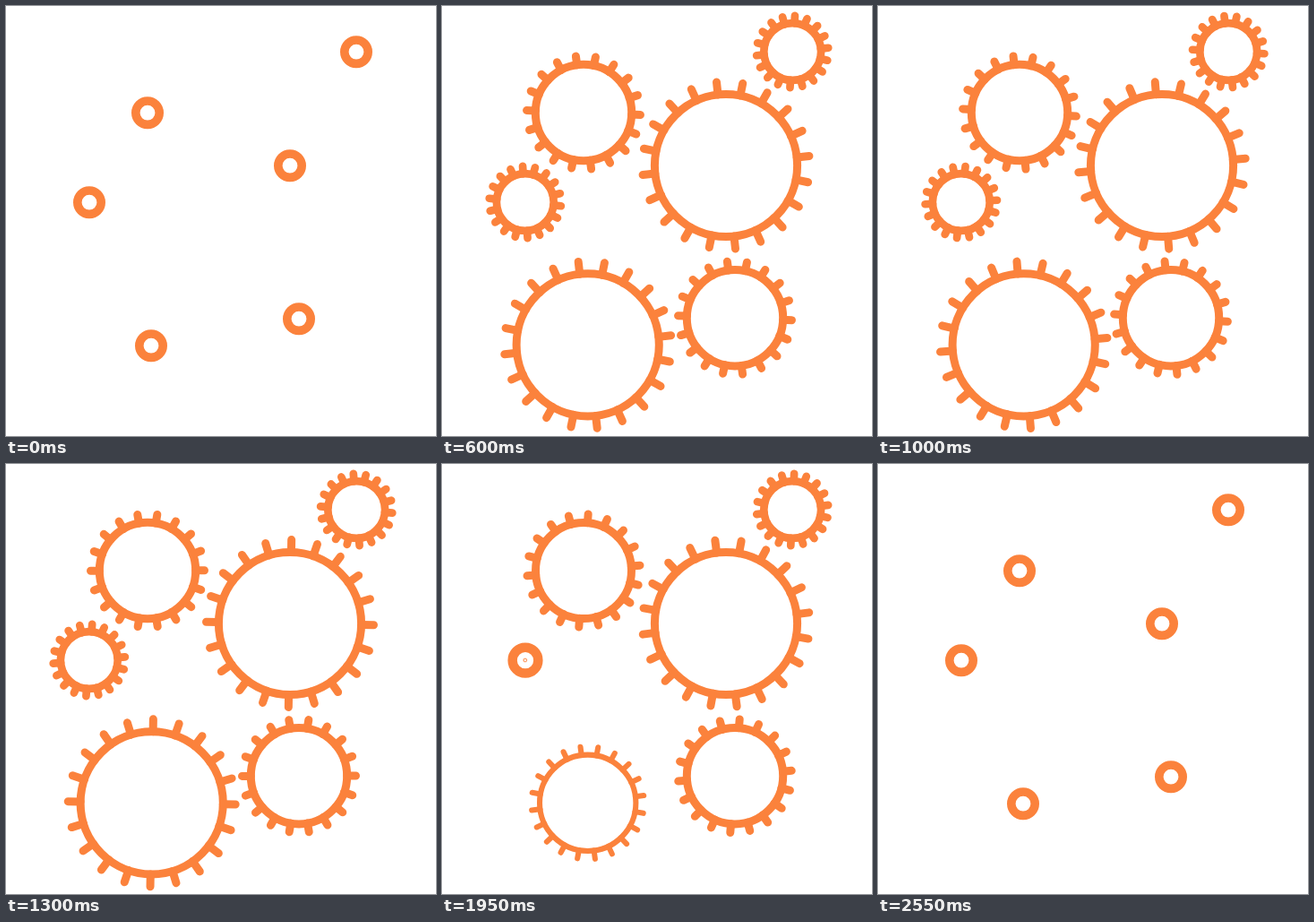
An HTML page with a canvas for the animation above (2750 ms loop, 480 by 480 pixels).

```html
<!DOCTYPE html>
<html lang="en">
<head>
<meta charset="utf-8">
<title>Gears</title>
<style>
  html, body { margin: 0; width: 100%; height: 100%; overflow: hidden; background: #fff; }
  canvas { display: block; width: 480px; height: 480px; }
</style>
</head>
<body>
<canvas id="stage" width="480" height="480"></canvas>
<script>
const ctx = document.getElementById('stage').getContext('2d');
const LOOP = 2750, STEP = 50, COLOR = '#fb823c';

// ring: centre-line radius, tip: outer end of the teeth, spin: degrees per second
const LARGE = { ring: 79.6, tip: 98, teeth: 20, spin: -40.75, line: 9 };
const MEDIUM = { ring: 53.7, tip: 68, teeth: 18, spin: 53.7, line: 9 };
const SMALL = { ring: 31.9, tip: 44.6, teeth: 18, spin: 73.2, line: 8.7 };

// In the order in which they open and close
const gears = [
  { x: 92.8, y: 219, ...SMALL, spin: -SMALL.spin },
  { x: 162.7, y: 378.3, ...LARGE },
  { x: 158, y: 119, ...MEDIUM },
  { x: 327, y: 348.2, ...MEDIUM },
  { x: 317, y: 178, ...LARGE },
  { x: 391.2, y: 51, ...SMALL }
];

const clamp = u => Math.max(0, Math.min(1, u));
const progress = (t, start, length) => clamp((t - start) / length);
const cubicInOut = u => u < 0.5 ? 4 * u ** 3 : 1 - 4 * (1 - u) ** 3;
const backOut = u => 1 + 2.70158 * (u - 1) ** 3 + 1.70158 * (u - 1) ** 2;
const backIn = u => 1 - backOut(1 - u);

function gearScale(t, i) {
  const open = cubicInOut(progress(t, 90 + 40 * i, 250));
  const close = cubicInOut(progress(t, 1720 + 100 * i, 300));
  return open - close;
}

function dotScale(t, i) {
  const out = 1 - backIn(progress(t, 40 * i, 200));
  const back = backOut(progress(t, 1850 + 100 * i, 200));
  return t < 1000 ? out : back;
}

function scaledAt(x, y, scale, draw) {
  if (scale < 0.002) return;
  ctx.save();
  ctx.translate(x, y);
  ctx.scale(scale, scale);
  draw();
  ctx.restore();
}

function ring(radius, width) {
  ctx.lineWidth = width;
  ctx.beginPath();
  ctx.arc(0, 0, radius, 0, Math.PI * 2);
  ctx.stroke();
}

function drawGear(gear, t) {
  ring(gear.ring, gear.line);
  ctx.rotate((-90 + gear.spin * t / 1000) * Math.PI / 180);
  ctx.beginPath();
  for (let k = 0; k < gear.teeth; k++) {
    ctx.moveTo(gear.ring, 0);
    ctx.lineTo(gear.tip - gear.line / 2, 0);
    ctx.rotate(Math.PI * 2 / gear.teeth);
  }
  ctx.stroke();
}

function render(now) {
  const t = Math.floor(now % LOOP / STEP) * STEP;
  ctx.fillStyle = '#fff';
  ctx.fillRect(0, 0, 480, 480);
  ctx.strokeStyle = COLOR;
  ctx.lineCap = 'round';
  gears.forEach((gear, i) => {
    scaledAt(gear.x, gear.y, gearScale(t, i), () => drawGear(gear, t));
    scaledAt(Math.floor(gear.x + 0.25), Math.round(gear.y + 0.3) + 0.2,
      dotScale(t, i), () => ring(13.2, 9.6));
  });
}

const start = performance.now();
function tick() {
  render(performance.now() - start);
  requestAnimationFrame(tick);
}
tick();
</script>
</body>
</html>
```
